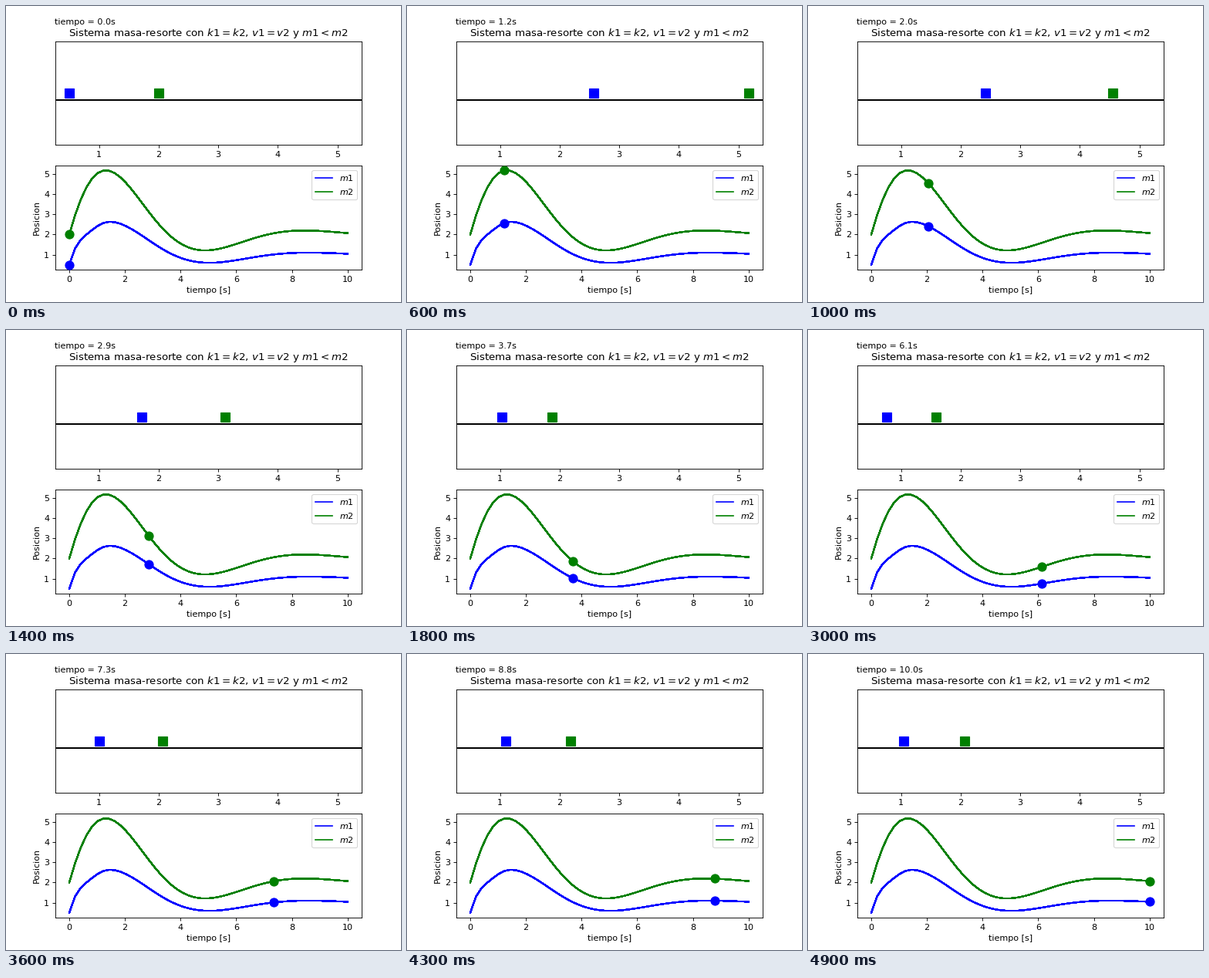
A matplotlib script for the animation above (5 s loop, 512x384 px).

```python
import matplotlib.pyplot as plt
import numpy as np
from matplotlib.animation import FuncAnimation

FRAMES = 50
DURATION = 10.0
M1, M2 = 0.2, 1.6      # masses
K = 3.0                # both springs
DAMPING = 1.0
REST_LENGTH = 1.0
SUBSTEPS = 40


def derivative(state):
    x1, v1, x2, v2 = state
    pull1 = K * (x1 - REST_LENGTH)
    pull2 = K * (x2 - x1 - REST_LENGTH)
    return np.array([v1, (-DAMPING * v1 - pull1 + pull2) / M1,
                     v2, (-DAMPING * v2 - pull2) / M2])


def rk4_step(state, h):
    a = derivative(state)
    b = derivative(state + h / 2 * a)
    c = derivative(state + h / 2 * b)
    d = derivative(state + h * c)
    return state + h / 6 * (a + 2 * b + 2 * c + d)


def simulate():
    state = np.array([0.5, 5.0, 2.0, 5.0])
    h = DURATION / (FRAMES - 1) / SUBSTEPS
    states = [state]
    for _ in range(FRAMES - 1):
        for _ in range(SUBSTEPS):
            state = rk4_step(state, h)
        states.append(state)
    return np.array(states)


times = np.linspace(0, DURATION, FRAMES)
states = simulate()
positions = [states[:, 0], states[:, 2]]
colors = ["blue", "green"]
labels = ["$m1$", "$m2$"]


def padded(low, high):
    pad = 0.05 * (high - low)
    return low - pad, high + pad


plt.rcParams["font.family"] = "DejaVu Sans"
fig, (track, graph) = plt.subplots(2, 1, figsize=(6.4, 4.8), dpi=80)
limits = padded(np.min(positions), np.max(positions))

track.set_title("Sistema masa-resorte con $k1=k2$, $v1=v2$ y $m1<m2$")
track.set_xlim(limits)
track.set_ylim(-0.055, 0.055)
track.set_yticks([])
track.axhline(-0.007, color="black", lw=1.8)
clock = track.text(0.25, 0.0731, "")

graph.set_xlim(padded(0, DURATION))
graph.set_ylim(limits)
graph.set_xlabel("tiempo [s]")
graph.set_ylabel("Posicion")
# Stacked strokes give the curves their hard, heavy edge.
for x, color, label in zip(positions, colors, labels):
    for layer in range(FRAMES):
        graph.plot(times, x, color=color, label=label if layer == 0 else None)
graph.legend(loc="upper right")

blocks = [track.plot([], [], "s", color=c, ms=10)[0] for c in colors]
dots = [graph.plot([], [], "o", color=c, ms=10, zorder=3)[0] for c in colors]


def update(frame):
    for x, block, dot in zip(positions, blocks, dots):
        block.set_data([x[frame]], [0])
        dot.set_data([times[frame]], [x[frame]])
    clock.set_text(f"tiempo = {times[frame]:.1f}s")
    return [*blocks, *dots, clock]


anim = FuncAnimation(fig, update, frames=FRAMES, interval=100,
                     repeat=True, repeat_delay=0, blit=False)
plt.show()
```
